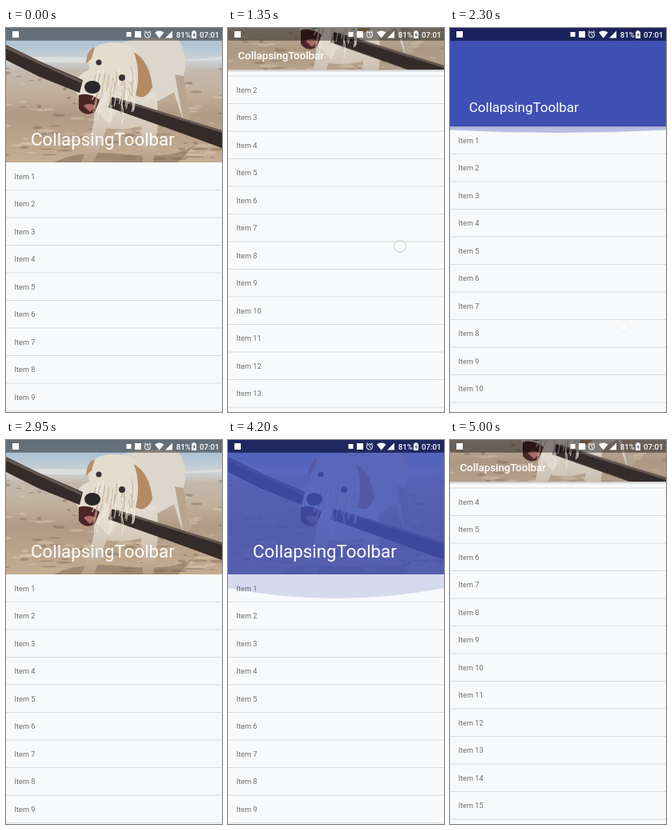
An HTML page for the animation above (5050 ms loop, 270 by 480 pixels).

```html
<!DOCTYPE html>
<html lang="en">
<head>
<meta charset="utf-8">
<title>Collapsing toolbar</title>
<style>
  html, body { margin: 0; width: 100%; height: 100%; overflow: hidden; background: #f8f9fa; }
  svg { display: block; width: 100vw; height: 100vh; font-family: Roboto, sans-serif; }
  #list text { font-size: 9.2px; fill: #6c6c6c; }
  #list path { stroke: #dbdcdd; }
  #status text { font-size: 9.7px; font-weight: 500; }
</style>
</head>
<body>
<svg viewBox="0 0 270 480">
  <defs>
    <linearGradient id="beach" x2="0" y2="1">
      <stop offset="0" stop-color="#a9bccd"/>
      <stop offset=".14" stop-color="#b3c6d6"/>
      <stop offset=".24" stop-color="#cdd3d6"/>
      <stop offset=".32" stop-color="#c3b8ad"/>
      <stop offset=".48" stop-color="#c2b09d"/>
      <stop offset=".64" stop-color="#b09a84"/>
      <stop offset="1" stop-color="#c5ad92"/>
    </linearGradient>
    <linearGradient id="fur" x2="0" y2="1">
      <stop offset="0" stop-color="#e3ddd4"/>
      <stop offset=".55" stop-color="#d3c6b6"/>
      <stop offset="1" stop-color="#b59b82"/>
    </linearGradient>
    <linearGradient id="shade" x2="0" y2="1">
      <stop offset="0" stop-opacity=".22"/>
      <stop offset="1" stop-opacity="0"/>
    </linearGradient>
    <filter id="soft" x="-5%" y="-5%" width="110%" height="110%"><feGaussianBlur stdDeviation=".7"/></filter>
    <clipPath id="headerClip"><rect id="headerBox" width="270" height="168"/></clipPath>
  </defs>

  <rect width="270" height="480" fill="#f8f9fa"/>
  <g id="list"></g>
  <path id="glow" fill="#3f51b5"/>
  <rect id="shadow" width="270" height="3.5" fill="url(#shade)"/>

  <g clip-path="url(#headerClip)">
    <g id="photo">
      <rect width="270" height="168" fill="url(#beach)"/>
      <g filter="url(#soft)">
        <path d="M0 37Q70 34 130 39T270 36V40Q200 42 130 43T0 41Z" fill="#dcdedd"/>
        <g id="sand"></g>
        <path d="M60 168Q90 152 150 158T235 147L215 168Z" fill="#806a57" opacity=".55"/>
        <path d="M146 18Q172 8 216 15Q229 36 222 60L231 110L222 118L210 80Q190 92 180 96Z" fill="#dcd6cc"/>
        <path d="M211 58L222 60L231 110L222 118Z" fill="#b7a591"/>
        <path d="M110 82L187 82Q194 106 184 168H171L169 122Q145 130 126 124L110 168H94Q106 140 110 116Z" fill="url(#fur)"/>
        <path d="M111 24Q130 12 160 23Q177 41 171 74Q158 96 141 101L128 120L116 106Q94 98 86 75Q88 58 104 52Q102 31 111 24Z" fill="#e4dccf"/>
        <path d="M160 30Q180 42 183 74Q174 92 162 84Q169 57 160 30Z" fill="#b48a64"/>
        <path d="M111 24Q101 27 100 45L107 38Z" fill="#b68e69"/>
        <path d="M0 21L43 42L96 65L92 81L42 61L0 40Z" fill="#352b28"/>
        <path d="M132 86L200 108L270 128V150L207 127L128 99Z" fill="#352b28"/>
        <path d="M0 22L95 66L94 69L0 26ZM138 87L270 128V131L138 90Z" fill="#65574f"/>
        <path d="M91 84Q104 80 117 90L111 105Q99 112 91 101Z" fill="#4b2524"/>
        <path d="M97 97Q106 92 112 98L105 105Z" fill="#b06e69"/>
        <g id="whiskers" fill="none" stroke-width="1.3"></g>
        <ellipse cx="108" cy="74" rx="10" ry="8" fill="#29272a"/>
        <circle cx="116" cy="43" r="3.5" fill="#373034"/>
        <circle cx="145" cy="62" r="4" fill="#373034"/>
      </g>
    </g>
    <rect id="scrim" width="270" height="168" fill="#3f50b5"/>
  </g>
  <rect width="270" height="15.8" opacity=".42"/>
  <rect id="statusScrim" width="270" height="15.8" fill="#1b235e"/>

  <g id="status" fill="#fff">
    <rect x="8" y="4" width="8" height="8"/>
    <rect x="150.5" y="5" width="6" height="6"/>
    <rect x="161" y="4" width="8" height="8"/>
    <g fill="none" stroke="#fff">
      <circle cx="177" cy="8.5" r="3.6"/>
      <path d="M177 6V8.7L179 10M172.6 5.5L175 3.6M181.4 5.5L179 3.6" stroke-width=".9"/>
    </g>
    <path d="M186 5.4Q191.7 1.7 197.4 5.4L191.7 12.7ZM199 12.5H208V3.5Z"/>
    <text x="212.8" y="11.7">81%</text>
    <path d="M232 4.5H233.6V3.3H236.4V4.5H238V13H232Z"/>
    <path d="M235.6 5.5L233.4 9.2H234.8V11.8L236.8 8.1H235.5Z" fill="#555b70"/>
    <text x="242" y="11.7">07:01</text>
  </g>

  <text id="title" fill="#fff">CollapsingToolbar</text>
  <circle id="touch" r="7.3" fill="#fff" fill-opacity=".45" stroke="#8d8d90" stroke-opacity=".45"/>
</svg>

<script>
const LOOP = 5050, STEP = 50, ROW = 34.5, EXPANDED = 168, RANGE = 116;
const $ = id => document.getElementById(id);
const set = (node, attrs) => {
  for (const key in attrs) node.setAttribute(key, attrs[key]);
  return node;
};
const add = (parent, tag, attrs) =>
  parent.appendChild(set(document.createElementNS("http://www.w3.org/2000/svg", tag), attrs));
const mix = (a, b, f) => a + (b - a) * f;
const clamp = v => Math.min(1, Math.max(0, v));

// Piecewise linear track of [time, value] pairs
function at(track, t) {
  const i = track.findIndex(key => key[0] > t);
  if (i === 0) return track[0][1];
  if (i < 0) return track[track.length - 1][1];
  const [t0, v0] = track[i - 1], [t1, v1] = track[i];
  return mix(v0, v1, (t - t0) / (t1 - t0));
}

function bezier(x1, y1, x2, y2) {
  const curve = (a, b, s) => 3 * (1 - s) ** 2 * s * a + 3 * (1 - s) * s * s * b + s ** 3;
  return x => {
    let lo = 0, hi = 1;
    for (let i = 0; i < 20; i++) {
      const mid = (lo + hi) / 2;
      if (curve(x1, x2, mid) < x) lo = mid; else hi = mid;
    }
    return curve(y1, y2, (lo + hi) / 2);
  };
}
const fastOutSlowIn = bezier(.4, 0, .2, 1);
const fastOutLinearIn = bezier(.4, 0, 1, 1);
const linearOutSlowIn = bezier(0, 0, .2, 1);

const shift = (track, dt) => track.map(([t, v]) => [t + dt, v]);
const PERIOD = 1850;
const fling = [
  [1150, 0], [1200, 18], [1250, 60], [1300, 102], [1350, 142.5], [1450, 250],
  [1550, 345], [1700, 440], [1800, 470], [1850, 442.5], [2050, 270], [2200, 150],
  [2250, RANGE], [2300, 45], [2350, 0]
];
const scrollTrack = [
  ...fling, ...shift(fling, PERIOD),
  [4800, 0], [4850, 15], [4900, 70], [4950, 140], [5000, 211.5]
];
const glowDepth = [[2250, 0], [2300, 8], [2350, 30], [2450, 33], [2800, 0]];
const glowAlpha = [[2250, .2], [2300, .35], [2350, .18], [2450, .16], [2800, 0]];

const touches = [
  { x: [[1200, 217], [1350, 215]], y: [[1200, 384], [1350, 273], [1400, 250]],
    alpha: [[999, 0], [1000, 1], [1350, 1], [1550, 0]] },
  { x: [[1850, 208], [2000, 217]], y: [[1800, 275], [1850, 330], [2000, 373]],
    alpha: [[1749, 0], [1750, 1], [2100, 1], [2350, 0]] },
  { x: [[3050, 217], [3200, 215]], y: [[3050, 384], [3200, 273], [3250, 250]],
    alpha: [[2999, 0], [3000, 1], [3200, 1], [3400, 0]] },
  { x: [[3700, 208], [3850, 217]], y: [[3650, 275], [3700, 330], [3850, 373]],
    alpha: [[3599, 0], [3600, 1], [3900, 1], [4150, 0]] },
  { x: [[4800, 217], [4900, 215]], y: [[4800, 384], [4900, 273]],
    alpha: [[4699, 0], [4700, 1], [4850, 1], [4950, 0]] }
];

function scrimAlpha(t) {
  const fade = (ease, start) => ease(clamp((t - start) / 600));
  if (t < 2300) return fade(fastOutLinearIn, 1300);
  if (t < 3100) return 1 - fade(linearOutSlowIn, 2300);
  if (t < 4170) return fade(fastOutLinearIn, 3150);
  if (t < 4900) return 1 - fade(linearOutSlowIn, 4170);
  return fade(fastOutLinearIn, 4930);
}

function build() {
  for (let i = 0; i < 26; i++) {
    const top = EXPANDED + i * ROW;
    add($("list"), "text", { x: 10.5, y: top + 20.9 }).textContent = `Item ${i + 1}`;
    add($("list"), "path", { d: `M0 ${top + ROW}H270` });
  }
  let seed = 7;
  const random = () => (seed = seed * 16807 % 2147483647) / 2147483647;
  for (let i = 0; i < 160; i++) {
    const depth = random();
    add($("sand"), "ellipse", {
      cx: random() * 270, cy: 50 + depth * 118,
      rx: 2 + random() * 9 * (.4 + depth), ry: .6 + random() * 1.6,
      fill: random() < .5 ? "#7d6857" : "#dccbb6", opacity: .45
    });
  }
  // Shaggy fur hanging around the muzzle
  for (let i = 0; i < 45; i++) {
    const x = 112 + random() * 48, y = 48 + random() * 50, lean = (x - 128) * .15;
    add($("whiskers"), "path", {
      d: `M${x} ${y}q${lean} 10 ${lean - 3} ${14 + random() * 10}`,
      stroke: random() < .5 ? "#b9a68e" : "#f1ece2", opacity: .7
    });
  }
}

function draw(t) {
  const scroll = at(scrollTrack, t);
  const offset = Math.min(scroll, RANGE), f = offset / RANGE;
  const bottom = EXPANDED - offset, scrim = scrimAlpha(t);

  set($("list"), { transform: `translate(0 ${-scroll})` });
  set($("headerBox"), { height: bottom });
  set($("photo"), { transform: `translate(0 ${-.7 * offset})` });
  set($("scrim"), { opacity: scrim });
  set($("statusScrim"), { opacity: scrim });
  set($("shadow"), { y: bottom, opacity: f });
  set($("title"), {
    x: mix(31, 12.4, f), y: mix(147, 38.7, f),
    "font-size": mix(22.3, 13.3, fastOutSlowIn(f)),
    "font-weight": f === 1 ? 500 : 400
  });

  const local = t > 4000 ? t - PERIOD : t;
  const d = at(glowDepth, local), edge = bottom + .57 * d;
  set($("glow"), {
    d: `M0 ${bottom}V${edge}Q135 ${bottom + 1.43 * d} 270 ${edge}V${bottom}Z`,
    opacity: d > 0 ? at(glowAlpha, local) : 0
  });

  const touch = touches.find(p => at(p.alpha, t) > 0);
  set($("touch"), touch
    ? { cx: at(touch.x, t), cy: at(touch.y, t), opacity: at(touch.alpha, t) }
    : { opacity: 0 });
}

build();
draw(0);
const start = performance.now();
(function tick() {
  const t = (performance.now() - start) % LOOP;
  draw(Math.floor(t / STEP) * STEP);
  requestAnimationFrame(tick);
})();
</script>
</body>
</html>
```
